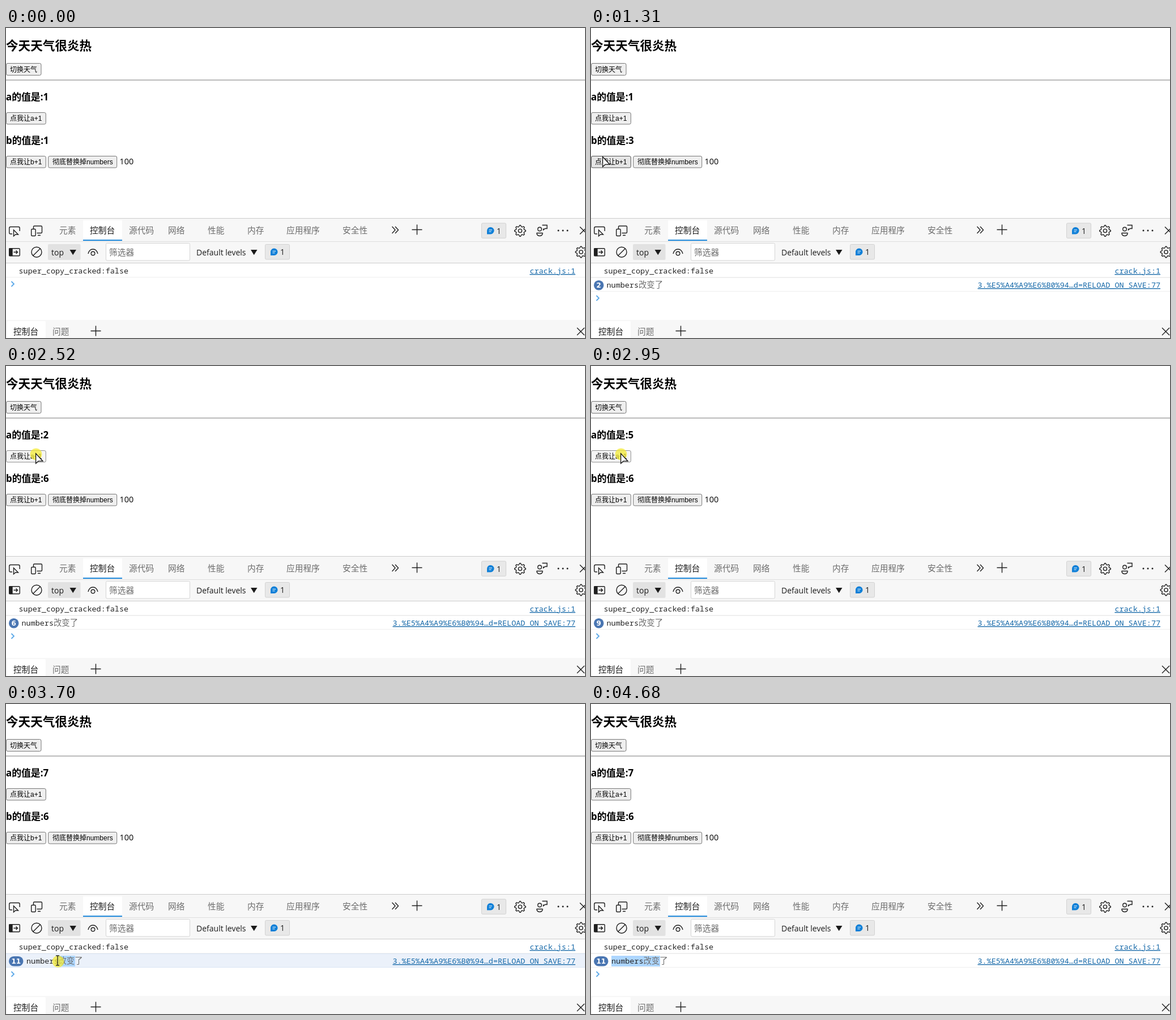
Write an HTML page that moves like this. It is 1022x548 px and loops after 4.78 s.

```html
<!DOCTYPE html>
<html lang="zh-CN">
<head>
<meta charset="utf-8">
<title>Console demo</title>
<style>
  html, body { margin: 0; width: 100%; height: 100%; overflow: hidden; background: #fff; }
  svg { display: block; width: 1022px; height: 548px; }
  text { font: 14.7px "Open Sans", "Noto Sans CJK SC", "Noto Sans CJK", sans-serif; fill: #1b1b1b; white-space: pre; }
  .h2 { font-size: 21.6px; font-weight: 700; fill: #000; }
  .h3 { font-size: 16.85px; font-weight: 700; fill: #000; }
  .btn rect { fill: #efefef; stroke: #767676; }
  .btn.hover rect { fill: #e5e5e5; stroke: #4f4f4f; }
  .btn.active rect { fill: #f5f5f5; stroke: #8d8d8d; }
  .btn text { font: 12px "Liberation Sans", "Noto Sans CJK SC", "Noto Sans CJK", sans-serif; fill: #000; }
  .dim { fill: #6c6c6c; }
  .ui { font-size: 14px; }
  .mono { font: 13.45px "Noto Sans Mono", "Noto Sans CJK SC", "Noto Sans CJK", monospace; fill: #242424; }
  .thin { font-size: 14.4px; font-weight: 300; fill: #707070; }
  .link { fill: #1568a8; text-decoration: underline; text-decoration-skip-ink: none; text-anchor: end; }
  .count { font: 700 12px "DejaVu Sans", sans-serif; fill: #fff; text-anchor: middle; }
  .icon { fill: none; stroke: #1f1f1f; stroke-width: 1.4; }
  .chip { fill: #e8e8e8; stroke: #d2d2d2; }
</style>
</head>
<body>
<svg viewBox="0 0 1022 548">
  <defs>
    <g id="gear"><path id="teeth"/><circle r="3.1"/></g>
    <g id="issue">
      <rect class="chip" x=".5" y=".5" width="43" height="26.5" rx="2"/>
      <path d="M10 20V14A6.3 6.3 0 1 1 16.3 20Z" fill="#1080d8"/>
      <path d="M13.5 12.5H19M13.5 15.5H17.5" stroke="#fff" stroke-width="1.1"/>
      <text class="ui" x="27" y="19">1</text>
    </g>
    <path id="plus" d="M-9 0H9M0 -9V9"/>
    <path id="cross" d="M-6.5 -6.5L6.5 6.5M-6.5 6.5L6.5 -6.5"/>
  </defs>

  <text class="h2" x="0" y="39">今天天气很炎热</text>
  <g class="btn"><rect x=".5" y="62.5" width="61.5" height="21" rx="2.5"/><text x="7" y="78">切换天气</text></g>
  <path d="M0 92H1022" stroke="#a3a3a3" stroke-width="1.4"/>
  <text class="h3" x="0" y="128" id="aValue"></text>
  <g class="btn" id="aButton"><rect x=".5" y="149.5" width="69.8" height="20.5" rx="2.5"/><text x="7" y="164">点我让a+1</text></g>
  <text class="h3" x="0" y="205" id="bValue"></text>
  <g class="btn" id="bButton"><rect x=".5" y="226.5" width="69.8" height="20.5" rx="2.5"/><text x="7" y="241">点我让b+1</text></g>
  <g class="btn"><rect x="74.7" y="226.5" width="121" height="20.5" rx="2.5"/><text x="82" y="241">彻底替换掉numbers</text></g>
  <text x="200.6" y="241" style="font-size:14.4px;fill:#000">100</text>

  <!-- tab bar and toolbar -->
  <rect y="336" width="1022" height="80" fill="#f7f7f7"/>
  <path d="M0 336.5H1022M0 415.5H1022" stroke="#cbcbcb"/>
  <path d="M0 377.5H1022" stroke="#dedede"/>
  <rect id="tabHover" x="82.5" y="340" width="53" height="36" fill="#e6e6e6"/>
  <rect x="136" y="340" width="69" height="36" fill="#fff"/>
  <rect x="136" y="374.3" width="69" height="1.8" fill="#0078d4"/>
  <g id="tabs"></g>
  <g class="icon">
    <path d="M11 364H8Q5.8 364 5.8 361.8V353.7Q5.8 351.5 8 351.5H22Q24.2 351.5 24.2 353.7V359"/>
    <path d="M13.5 357V368L16.7 365H21.5Z" fill="#f7f7f7"/>
    <path d="M48.5 355V351.5Q48.5 350 50 350H62Q63.5 350 63.5 351.5V361Q63.5 362.5 62 362.5H54.5M56 366.5H61"/>
    <rect x="44.7" y="355.5" width="7.5" height="12" rx="1.5"/>
    <path d="M681.5 351L687 357L681.5 363M687 351L692.5 357L687 363"/>
    <use href="#plus" x="725.5" y="356.5"/>
    <use href="#gear" x="907.5" y="358.5"/>
    <circle cx="942" cy="355.5" r="3.3"/>
    <path d="M937 362.5H947V364Q946 367.5 942 367.5T937 364ZM946.5 348.5H955V354.5H951.5L948.5 357V354.5"/>
    <use href="#cross" x="1019.5" y="358"/>
  </g>
  <g fill="#222"><circle cx="975" cy="358" r="1.5"/><circle cx="983" cy="358" r="1.5"/><circle cx="991" cy="358" r="1.5"/></g>
  <use href="#issue" x="839" y="344.5"/>

  <rect x="74" y="382" width="57.5" height="28" rx="2" fill="#e2e2e2"/>
  <text class="ui" x="80" y="401.5">top</text>
  <path d="M112.5 392H124L118.2 401.2ZM432 392H443.5L437.7 401.2Z" fill="#1b1b1b"/>
  <rect x="176.5" y="380.5" width="148" height="30.5" rx="2" fill="#fff" stroke="#d4d4d4"/>
  <text class="dim" x="182" y="402">筛选器</text>
  <text class="ui" x="336" y="401.5">Default levels</text>
  <use href="#issue" x="457" y="382"/>
  <g class="icon">
    <rect x="5.8" y="389.7" width="18.5" height="13" rx="1.5"/>
    <path d="M6 390H11V402.5H6Z" fill="#1f1f1f"/>
    <path d="M13.5 396.2H20M17.5 393.2L20.5 396.2L17.5 399.2"/>
    <circle cx="54" cy="396.2" r="9"/><path d="M47.7 402.5L60.3 389.9"/>
    <path d="M145 399Q147 391 153.5 391T162 399"/><circle cx="153.5" cy="398.5" r="3.3"/>
    <use href="#gear" x="1015" y="396"/>
  </g>

  <!-- console -->
  <rect y="416" width="1022" height="100" fill="#fff"/>
  <path d="M0 440.5H1022" stroke="#efefef"/>
  <text class="mono" x="22.5" y="434">super_copy_cracked:false</text>
  <text class="mono link" x="1005" y="434">crack.js:1</text>
  <g id="logRow">
    <rect id="rowBack" y="441" width="1022" height="25"/>
    <path id="rowLines" d="M0 441.5H1022M0 465.5H1022"/>
    <rect id="selection" y="445" height="19" fill="#add6ff"/>
    <rect id="badge" x="5" y="446" height="17.5" rx="8.7" fill="#4a76b2"/>
    <text class="count" id="count" y="459"></text>
    <text class="mono" id="message" y="459">numbers<tspan class="thin">改变了</tspan></text>
    <text class="mono link" x="1005" y="459">3.%E5%A4%A9%E6%B0%94…d=RELOAD_ON_SAVE:77</text>
  </g>
  <path id="prompt" d="M9.5 448L14 452.5L9.5 457" fill="none" stroke="#5ba8e8" stroke-width="1.8"/>

  <!-- drawer -->
  <rect y="516" width="1022" height="32" fill="#f7f7f7"/>
  <path d="M2 548V520Q2 518 4 518H68Q70 518 70 520V548Z" fill="#fff"/>
  <text x="13" y="541.5">控制台</text>
  <text class="dim" x="82" y="541.5">问题</text>
  <g class="icon"><use href="#plus" x="158.5" y="535.5"/><use href="#cross" x="1014.5" y="536.5"/></g>

  <g id="pointer">
    <circle id="press" cx="1" cy="2" r="10.5" fill="#f3ea35" opacity=".75"/>
    <path id="arrow" d="M.6 .6V18.3L5.2 14.2H13Z" fill="#fff" stroke="#111" stroke-width="1.3"/>
    <g id="resize" fill="#fff" stroke="#111" stroke-width="1.2">
      <path d="M0 -10.5L4.5 -4.5H-4.5ZM0 10.5L4.5 4.5H-4.5Z"/>
      <circle r="2.7"/><circle r=".6"/>
    </g>
    <path id="beam" d="M-3 -8.5H3M0 -8.5V8.5M-3 8.5H3" fill="none" stroke="#111" stroke-width="1.2"/>
  </g>
</svg>
<script>
const LOOP = 4780, STEP = 30;
const $ = id => document.getElementById(id);
const set = (id, attrs) => Object.entries(attrs).forEach(([k, v]) => $(id).setAttribute(k, v));
const show = (id, on) => set(id, { display: on ? 'inline' : 'none' });
const within = (t, [from, to]) => t >= from && t < to;

// [mouse down, mouse up]
const bClicks = [[700, 1080], [1240, 1310], [1540, 1610], [1700, 1760], [1840, 1890]];
const aClicks = [[2330, 2400], [2460, 2530], [2590, 2660], [2720, 2810], [2870, 3020], [3080, 3130]];
const drag = [3600, 3850];

// [time, x, y]
const path = [
  [100, 863, 525], [540, 20, 227], [1930, 20, 227], [2020, 50, 175], [2050, 51, 164],
  [2140, 52, 154], [3180, 52, 154], [3360, 104, 380], [3390, 110, 398], [3570, 122, 454],
  [3600, 122, 454], [3850, 36, 452], [3880, 34, 445], [3940, 49, 447], [4180, 574, 548]
];

const tabs = { 元素: 94, 控制台: 148, 源代码: 217, 网络: 286, 性能: 356, 内存: 426, 应用程序: 495, 安全性: 594 };
$('tabs').innerHTML = Object.entries(tabs).map(([name, x]) =>
  `<text x="${x}" y="363"${name === '控制台' ? '' : ' class="dim"'}>${name}</text>`).join('');

const teeth = Array.from({ length: 32 }, (_, i) => {
  const r = i % 4 < 2 ? 9.8 : 7.5, angle = (i - .5) * Math.PI / 16;
  return `${(r * Math.cos(angle)).toFixed(2)} ${(r * Math.sin(angle)).toFixed(2)}`;
});
set('teeth', { d: `M${teeth.join('L')}Z`, 'stroke-linejoin': 'round' });

function pointerAt(t) {
  const next = path.findIndex(p => p[0] > t);
  if (next <= 0) return null;
  const [t0, x0, y0] = path[next - 1], [t1, x1, y1] = path[next];
  const k = Math.floor((t - t0) / STEP) * STEP / (t1 - t0);
  return { x: x0 + (x1 - x0) * k, y: y0 + (y1 - y0) * k };
}

function paintButton(id, top, pointer, clicks, t) {
  const over = pointer && pointer.x < 71 && pointer.y >= top && pointer.y < top + 22;
  const down = clicks.some(c => within(t, c));
  $(id).setAttribute('class', 'btn' + (down ? ' active' : over ? ' hover' : ''));
}

function draw(t) {
  const pointer = pointerAt(t);
  const done = clicks => clicks.filter(c => t >= c[1]).length;
  const a = done(aClicks), b = done(bClicks), total = a + b;
  $('aValue').textContent = `a的值是:${1 + a}`;
  $('bValue').textContent = `b的值是:${1 + b}`;
  paintButton('aButton', 149, pointer, aClicks, t);
  paintButton('bButton', 226, pointer, bClicks, t);

  const resizing = within(t, [3330, 3390]), selecting = within(t, [3540, 3850]);
  show('tabHover', resizing);
  $('tabs').firstChild.setAttribute('class', resizing ? '' : 'dim');

  const rowOver = within(t, [3510, 4680]);
  const wide = total > 9, badged = total > 1;
  show('logRow', total > 0);
  set('rowBack', { fill: rowOver ? '#ebf1fa' : '#fff' });
  set('rowLines', { stroke: rowOver ? '#d9e5f5' : '#efefef' });
  show('badge', badged);
  set('badge', { width: wide ? 25.5 : 17.5 });
  set('count', { x: wide ? 17.8 : 13.8 });
  $('count').textContent = badged ? total : '';
  set('message', { x: wide ? 36 : badged ? 27.5 : 22.5 });
  const left = within(t, drag) ? Math.max(36, pointer.x) : t < drag[0] ? 122 : 36;
  set('selection', { x: left, width: 122 - left });
  set('prompt', { transform: `translate(0 ${total ? 25 : 0})` });

  show('pointer', pointer);
  if (!pointer) return;
  set('pointer', { transform: `translate(${pointer.x} ${pointer.y})` });
  show('resize', resizing);
  show('beam', selecting);
  show('arrow', !resizing && !selecting);
  show('press', [...aClicks, ...bClicks, drag].some(c => within(t, c)));
}

const start = performance.now();
function tick() {
  draw((performance.now() - start) % LOOP);
  requestAnimationFrame(tick);
}
tick();
</script>
</body>
</html>
```
